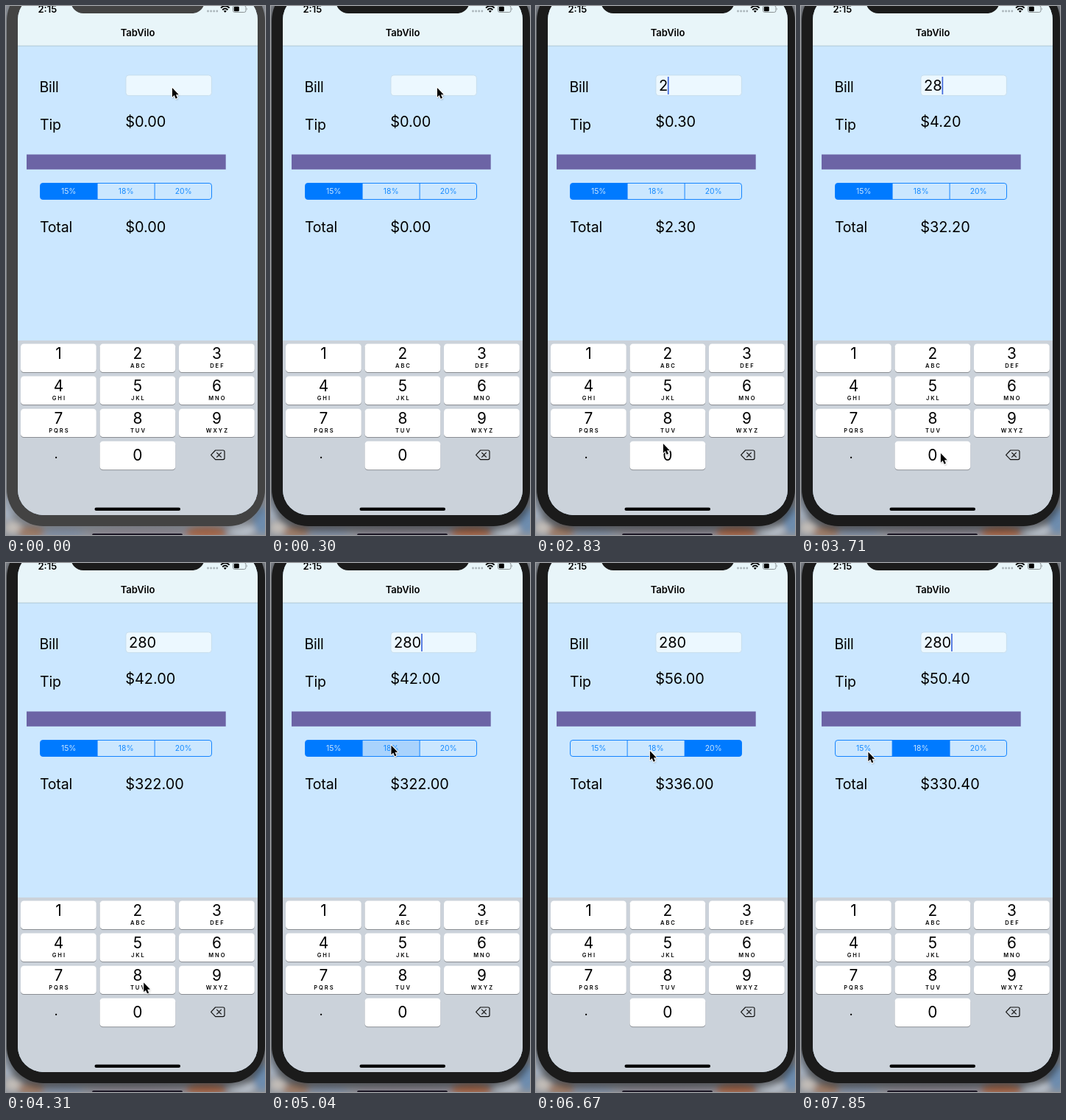
Write an HTML page that moves like this. It is 352 px wide and 718 px high and loops after 8000 ms.

```html
<!DOCTYPE html>
<html lang="en">
<head>
<meta charset="utf-8">
<title>Tip calculator</title>
<style>
html, body { margin: 0; width: 100%; height: 100%; overflow: hidden; background: #85898f; }
svg { display: block; width: 352px; height: 718px; font-family: Inter, "Liberation Sans", sans-serif; }
.label { font-size: 19.5px; letter-spacing: -.2px; }
.value { font-size: 19.9px; }
.digit { font-size: 20.8px; text-anchor: middle; }
.letters { font-size: 7.5px; font-weight: 600; letter-spacing: 2px; text-anchor: middle; }
.seg { font-size: 10.3px; text-anchor: middle; }
</style>
</head>
<body>
<svg viewBox="0 0 352 718">
  <defs>
    <clipPath id="screen"><rect x="16" y="-16" width="326" height="707" rx="35"/></clipPath>
    <clipPath id="pill"><rect x="46.5" y="240.5" width="233" height="22" rx="3.5"/></clipPath>
    <filter id="blur"><feGaussianBlur stdDeviation="4"/></filter>
    <filter id="soft" x="-50%" y="-50%" width="200%" height="200%"><feGaussianBlur stdDeviation="1"/></filter>
  </defs>

  <!-- desktop -->
  <rect width="352" height="718" fill="#8f949c"/>
  <g filter="url(#blur)">
    <ellipse cx="2" cy="682" rx="12" ry="16" fill="#a9b4c2"/>
    <ellipse cx="10" cy="708" rx="12" ry="9" fill="#c3bdb8"/>
    <ellipse cx="34" cy="714" rx="18" ry="8" fill="#9c7a66"/>
    <ellipse cx="78" cy="716" rx="28" ry="7" fill="#8390a4"/>
    <ellipse cx="180" cy="716" rx="70" ry="7" fill="#8f8a94"/>
    <ellipse cx="272" cy="715" rx="28" ry="8" fill="#a8694b"/>
    <ellipse cx="320" cy="711" rx="18" ry="9" fill="#b9c1cb"/>
    <ellipse cx="348" cy="698" rx="12" ry="18" fill="#6d8cae"/>
  </g>
  <rect id="shade" x="-3" y="-30" width="359" height="743" rx="54" filter="url(#blur)"/>
  <rect x="117" y="716" width="123" height="4" rx="2" fill="#1d1826"/>

  <!-- phone -->
  <rect id="bezel" x="1" y="-30" width="351" height="736" rx="50"/>
  <g clip-path="url(#screen)">
    <rect x="15" width="328" height="718" fill="#cbe7ff"/>
    <rect x="15" y="-20" width="328" height="74" fill="#e8f5f9"/>
    <rect x="15" y="53.7" width="328" height=".8" fill="#a8bfca"/>
    <rect x="15" y="454" width="328" height="240" fill="#cbd2da"/>
    <path id="notch" d="M82-16Q88-16 88-10V-7A17 17 0 0 0 105 10H253A17 17 0 0 0 270-7V-10Q270-16 276-16Z"/>
  </g>

  <!-- status and title -->
  <text x="43.5" y="9" font-size="13" font-weight="600">2:15</text>
  <g fill="#a9b4b9">
    <circle cx="274.5" cy="7" r="1.4"/><circle cx="278.6" cy="7" r="1.4"/>
    <circle cx="282.7" cy="7" r="1.4"/><circle cx="286.8" cy="7" r="1.4"/>
  </g>
  <g fill="none" stroke="#000" stroke-width="1.9">
    <path d="M292 2.6Q297.8-2.6 303.6 2.6"/>
    <path d="M294.2 5.2Q297.8 2 301.4 5.2"/>
  </g>
  <path d="M295.8 6.8Q297.8 5.2 299.8 6.8L297.8 9Z"/>
  <rect x="308.5" y="-.5" width="17.5" height="9" rx="2.3" fill="none" stroke="#7f878a" stroke-width=".9"/>
  <rect x="309.8" y=".8" width="7" height="6.4" rx="1.2"/>
  <path d="M327 2.6Q328.6 4 327 5.6Z" fill="#7f878a"/>
  <text x="179" y="41.3" font-size="13" font-weight="600" text-anchor="middle">TabVilo</text>

  <!-- form -->
  <text class="label" x="45.5" y="116.7">Bill</text>
  <text class="label" x="46" y="167.5">Tip</text>
  <text class="label" x="46" y="306.7">Total</text>
  <rect x="162.9" y="93.9" width="116.5" height="27.8" rx="4" fill="#ecf8ff" stroke="#c5dceb" stroke-width=".9"/>
  <text id="bill" x="167" y="115" font-size="20"></text>
  <rect id="caret" y="96" width="1.7" height="24" fill="#4169dc"/>
  <text id="tip" class="value" x="162.2" y="164.3"></text>
  <text id="total" class="value" x="162.2" y="306.8"></text>
  <rect x="28" y="201.5" width="270.7" height="20.3" fill="#6c64a5"/>
  <g id="segs" clip-path="url(#pill)"></g>
  <rect x="46.5" y="240.5" width="233" height="22" rx="3.5" fill="none" stroke="#007aff" stroke-width=".9"/>
  <path d="M124.1 240.5V262.5M202.1 240.5V262.5" stroke="#007aff" stroke-width=".9"/>
  <g id="segText"></g>

  <!-- keyboard -->
  <g id="keys"></g>
  <text class="digit" x="68" y="614" style="font-size:18px">.</text>
  <g fill="none" stroke="#111" stroke-width="1.2" stroke-linejoin="round" stroke-linecap="round">
    <path d="M278.6 609.3L284.6 603H295Q297 603 297 605V613.6Q297 615.6 295 615.6H284.6Z"/>
    <path d="M286.6 606.4L292.4 612.2M292.4 606.4L286.6 612.2"/>
  </g>
  <rect x="120.5" y="680.7" width="116.5" height="4.3" rx="2.1"/>

  <g id="pointer">
    <path d="M.5 2.5V16L3.8 13.4L6 18L8.4 17L6.4 12.4H10.4Z" fill="#000" opacity=".3" filter="url(#soft)"/>
    <path d="M.4 1.4V14.2L3.2 11.6L5.2 16.2L7.4 15.3L5.4 10.7H9.2Z" stroke="#fff" stroke-width="2" stroke-linejoin="round" paint-order="stroke"/>
  </g>
</svg>
<script>
const LOOP = 8000, TICK = 148.2;
const $ = id => document.getElementById(id);
const RATES = [15, 18, 20];
const LETTERS = ['', 'ABC', 'DEF', 'GHI', 'JKL', 'MNO', 'PQRS', 'TUV', 'WXYZ'];

// pointer stops: tick, x, y
const PATH = [
  [5, 225.5, 109.5], [8, 163, 478], [9, 155, 480], [11, 167, 476],
  [16, 167, 476], [19, 172.5, 592.5], [21, 178, 567], [22, 178, 567],
  [25, 189.5, 605.5], [28, 189.5, 605.5], [33, 163, 246], [36, 163, 246],
  [39, 236, 250], [42, 236, 250], [45, 154.5, 253.5], [48, 154.5, 253.5],
  [52, 91, 255]
];
// state changes: tick, new value
const BILL = [[0, ''], [16, '2'], [22, '28'], [27, '280']];
const KEY = [[0, -1], [15, 2], [16, -1], [21, 8], [22, -1], [26, 0], [27, -1]];
const SELECTED = [[0, 0], [35, 1], [41, 2], [48, 1]];
const TOUCHED = [[0, -1], [34, 1], [35, -1], [40, 2], [41, -1], [47, 1], [48, -1]];

const at = (list, k) => list.filter(e => e[0] <= k).pop()[1];
const money = v => '$' + v.toFixed(2);

function buildKeys() {
  let out = '';
  for (const n of [1, 2, 3, 4, 5, 6, 7, 8, 9, 0]) {
    const i = n ? n - 1 : 10;
    const x = 20 + (i % 3) * 107.5, y = 458.5 + Math.floor(i / 3) * 44.1;
    const mid = x + 51.4;
    out += `<rect x="${x}" y="${y + 1}" width="102.8" height="38.4" rx="4.3" fill="#898d92"/>
      <rect id="key${n}" x="${x}" y="${y}" width="102.8" height="38.4" rx="4.3"/>
      <text class="digit" x="${mid}" y="${y + (n ? 20.7 : 26)}">${n}</text>`;
    if (n > 1) out += `<text class="letters" x="${mid + 1}" y="${y + 32}">${LETTERS[n - 1]}</text>`;
  }
  $('keys').innerHTML = out;
}

function buildSegments() {
  $('segs').innerHTML = RATES.map((r, i) =>
    `<rect id="seg${i}" x="${46.2 + i * 77.9}" y="240" width="78" height="23"/>`).join('');
  $('segText').innerHTML = RATES.map((r, i) =>
    `<text id="rate${i}" class="seg" x="${85.2 + i * 78}" y="255.3">${r}%</text>`).join('');
}

function pointerAt(k) {
  const i = PATH.findIndex(p => p[0] > k);
  if (i === 0) return PATH[0].slice(1);
  if (i < 0) return PATH[PATH.length - 1].slice(1);
  const [a, ax, ay] = PATH[i - 1], [b, bx, by] = PATH[i];
  const u = (k - a) / (b - a), e = u * u * (3 - 2 * u);
  return [ax + (bx - ax) * e, ay + (by - ay) * e];
}

function draw(ms) {
  const k = Math.floor((ms + 12) / TICK);
  const bill = at(BILL, k), sel = at(SELECTED, k), touched = at(TOUCHED, k), key = at(KEY, k);
  const amount = Number(bill), tip = amount * RATES[sel] / 100;

  // the window gains focus after the first tick
  const shell = k < 1 ? '#434343' : '#1b1b1b';
  $('bezel').setAttribute('fill', shell);
  $('notch').setAttribute('fill', shell);
  $('shade').setAttribute('opacity', k < 1 ? .15 : .4);

  $('bill').textContent = bill;
  $('tip').textContent = money(tip);
  $('total').textContent = money(amount + tip);

  const typing = k >= 16 && k <= 26;
  const blink = k > 26 && (k * TICK - 3790) % 1000 < 500;
  $('caret').setAttribute('x', 166.3 + bill.length * 12.6);
  $('caret').setAttribute('opacity', typing || blink ? 1 : 0);

  RATES.forEach((r, i) => {
    $('seg' + i).setAttribute('fill', i === sel ? '#007aff' : i === touched ? '#a9d3fd' : '#cbe7ff');
    $('rate' + i).setAttribute('fill', i === sel ? '#cbe7ff' : '#168aff');
  });
  for (let n = 0; n < 10; n++) $('key' + n).setAttribute('fill', n === key ? '#b9c0ca' : '#fff');

  const [x, y] = pointerAt(k);
  $('pointer').setAttribute('transform', `translate(${x} ${y})`);
}

buildKeys();
buildSegments();
const start = performance.now();
function loop() {
  draw((performance.now() - start) % LOOP);
  requestAnimationFrame(loop);
}
draw(0);
requestAnimationFrame(loop);
</script>
</body>
</html>
```
